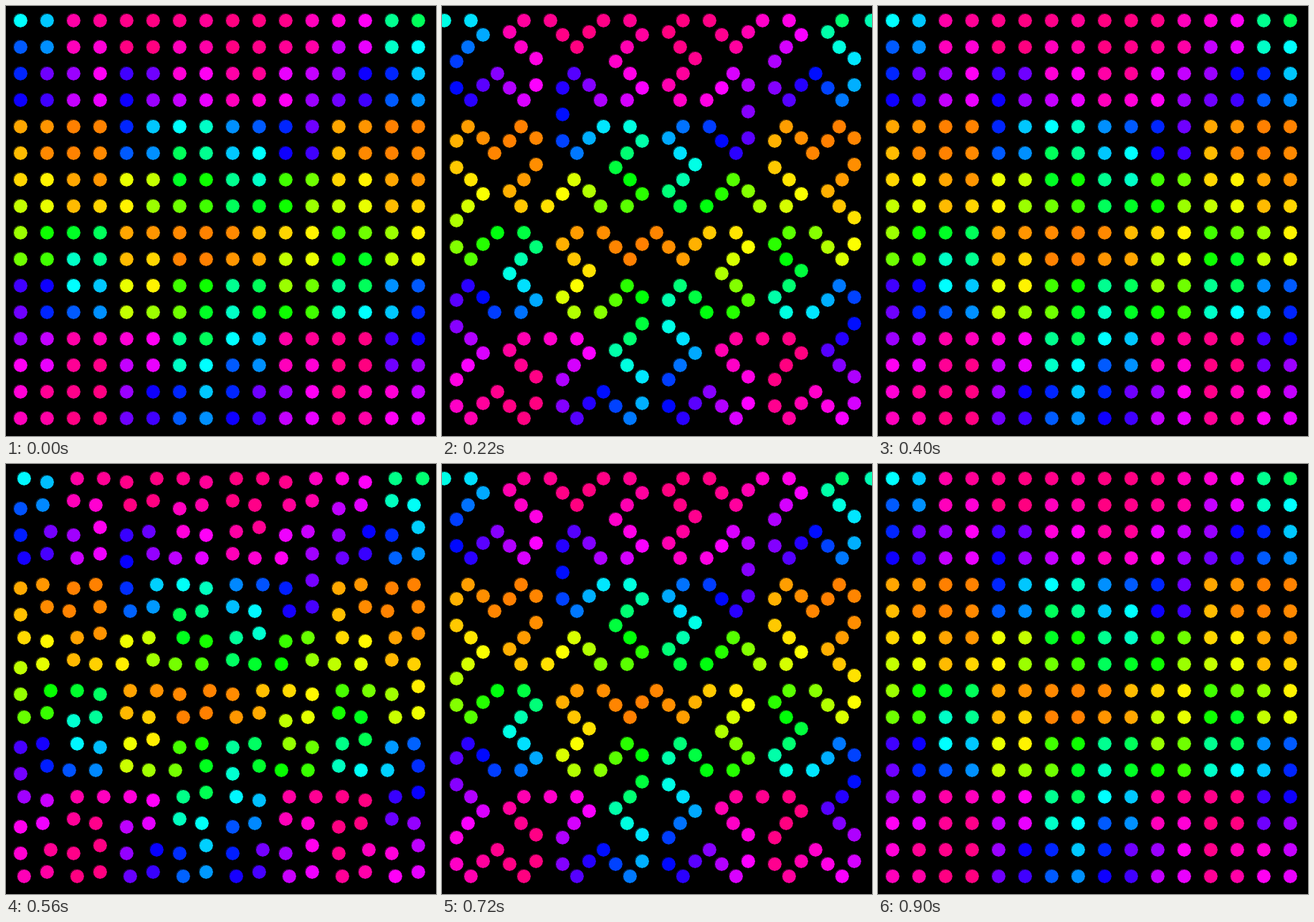
An HTML page with a canvas for the animation above (1000 ms loop, 600x600 px).

```html
<!DOCTYPE html>
<html lang="en">
<head>
<meta charset="utf-8">
<title>Dots on a Hilbert curve</title>
<style>
  html, body { margin: 0; width: 100%; height: 100%; overflow: hidden; background: #000; }
  canvas { display: block; width: 600px; height: 600px; }
</style>
</head>
<body>
<canvas id="stage" width="600" height="600"></canvas>
<script>
const ctx = document.getElementById('stage').getContext('2d');
const SIDE = 16, COUNT = SIDE * SIDE;
const GAP = 37, EDGE = 20, RADIUS = 10;
const CYCLE = 500, TICK = 20, STEPS = 20;

// Cell of the Hilbert curve at index d, as a point on the stage
function hilbert(d) {
  let x = 0, y = 0;
  for (let s = 1; s < SIDE; s *= 2) {
    const rx = 1 & (d >> 1);
    const ry = 1 & (d ^ rx);
    if (!ry) {
      if (rx) { x = s - 1 - x; y = s - 1 - y; }
      [x, y] = [y, x];
    }
    x += s * rx;
    y += s * ry;
    d >>= 2;
  }
  return { x: EDGE + x * GAP, y: EDGE + y * GAP };
}

const path = Array.from({ length: COUNT }, (_, i) => hilbert(i));
const entry = { x: EDGE - GAP, y: EDGE };
const exit = { x: 600 + EDGE, y: EDGE };

const hueAt = i => 180 + 150 * Math.sin(i * 5 * Math.PI / 180);
const mix = (a, b, p) => a + (b - a) * p;

function dot(from, to, p, hue) {
  const x = Math.floor(mix(from.x, to.x, p));
  const y = Math.floor(mix(from.y, to.y, p));
  ctx.fillStyle = `hsl(${hue}, 100%, 50%)`;
  ctx.beginPath();
  ctx.arc(x, y, RADIUS, 0, 2 * Math.PI);
  ctx.fill();
  // black rim, half a pixel off the fill
  ctx.beginPath();
  ctx.arc(x + 0.5, y + 0.5, RADIUS, 0, 2 * Math.PI);
  ctx.stroke();
}

function draw(time) {
  const step = Math.min(STEPS, Math.floor((time % CYCLE) / TICK));
  const p = step / STEPS;
  ctx.fillStyle = '#000';
  ctx.fillRect(0, 0, 600, 600);
  ctx.strokeStyle = '#000';
  ctx.lineWidth = 1;

  dot(entry, path[0], p, hueAt(p - 1));
  for (let i = 0; i < COUNT - 1; i++) dot(path[i], path[i + 1], p, hueAt(i + p));
  dot(path[COUNT - 1], exit, p, mix(hueAt(COUNT - 1), hueAt(0), p));
}

let start;
function frame(now) {
  if (start === undefined) start = now;
  draw(Math.max(0, now - start));
  requestAnimationFrame(frame);
}
draw(0);
requestAnimationFrame(frame);
</script>
</body>
</html>
```
